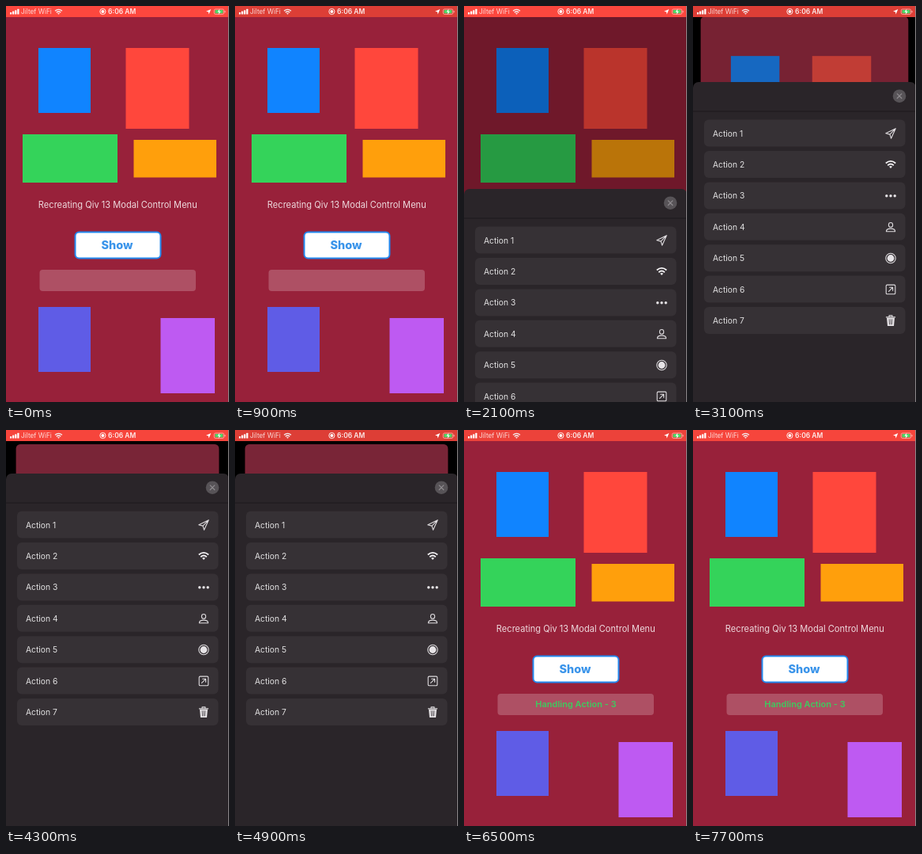
Recreate the animation shown at these times as an HTML page. Size 282x500 px, loop 7900 ms.

```html
<!DOCTYPE html>
<html lang="en">
<head>
<meta charset="utf-8">
<title>Modal control menu</title>
<style>
  html, body { margin: 0; width: 100%; height: 100%; overflow: hidden; background: #000; }
  svg { display: block; width: 100vw; height: 100vh; }
  text { font-family: Inter, Roboto, sans-serif; fill: #fff; }
  .icon { fill: none; stroke: #dedbde; stroke-width: 1.1; stroke-linejoin: round; stroke-linecap: round; }
  .solid { fill: #e6e3e6; stroke: none; }
</style>
</head>
<body>
<svg viewBox="0 0 282 500" preserveAspectRatio="none">
  <defs>
    <g id="wifi" fill="none" stroke="#f2f0f2" stroke-width="1.8" stroke-linecap="butt">
      <path d="M-6.2-1.8Q0-7 6.2-1.8M-3.8.9Q0-2.4 3.8.9"/>
      <path d="M-2 2.5Q0 .8 2 2.5L0 4.6Z" fill="#f2f0f2" stroke="none"/>
    </g>
  </defs>
  <rect width="282" height="500"/>
  <g id="page">
    <rect class="cover" width="282" height="520" fill="#98213a"/>
    <g id="blocks"></g>
    <text x="141.3" y="255" font-size="11.1" text-anchor="middle" fill-opacity=".83">Recreating Qiv 13 Modal Control Menu</text>
    <rect x="87.5" y="285.5" width="108" height="33" rx="5" fill="#fff" stroke="#2388ee" stroke-width="2"/>
    <text x="140.5" y="307" font-size="14.5" font-weight="800" text-anchor="middle" style="fill:#3a94ea">Show</text>
    <rect x="42.5" y="333" width="197.5" height="27" rx="4" fill="#fff" fill-opacity=".21"/>
    <text id="result" x="141.5" y="350.3" font-size="11" font-weight="600" text-anchor="middle" style="fill:#3ecb5f">Handling Action - 3</text>
    <rect id="dim" class="cover" width="282" height="520"/>
    <rect id="haze" class="cover" width="282" height="520" fill="#fff"/>
  </g>
  <g id="sheet">
    <rect width="282" height="700" rx="7" fill="#2a2529"/>
    <path d="M0 37H282" stroke="#1d191c" stroke-width="1"/>
    <circle cx="261" cy="17.7" r="8.3" fill="#575357"/>
    <path d="M258.2 14.9l5.6 5.6m0-5.6l-5.6 5.6" stroke="#8f8b8f" stroke-width="1.2" stroke-linecap="round"/>
    <g id="rows"></g>
  </g>
  <g id="status">
    <rect width="282" height="14" fill="#fd473e"/>
    <rect id="pulse" width="282" height="14"/>
    <g id="bars" fill="#fff"></g>
    <text x="19" y="10.2" font-size="8.3" fill-opacity=".8">Jiltef WiFi</text>
    <use href="#wifi" transform="translate(66.5 7.5) scale(.72)"/>
    <circle cx="122.4" cy="7" r="3.6" fill="none" stroke="#fff" stroke-opacity=".9"/>
    <circle cx="122.4" cy="7" r="2" fill="#fff"/>
    <text x="129" y="10.2" font-size="8.5" font-weight="600" fill-opacity=".9">6:06 AM</text>
    <path d="M259.3 4L253 6.8L256 7.5L256.5 10.4Z" fill="#fff"/>
    <rect x="263.2" y="4" width="12.4" height="6.4" rx="1.7" fill="none" stroke="#ffb5b0" stroke-width=".8"/>
    <rect x="264.4" y="5.1" width="10" height="4.2" rx=".8" fill="#4bd765"/>
    <path d="M270.4 3.5L267.4 7.6H269.4L268.5 11L271.7 6.7H269.7Z" fill="#fff"/>
    <path d="M277 6v2.4" stroke="#ffb5b0"/>
  </g>
  <rect x="281" width="1" height="500" fill="#8c888a"/>
</svg>
<script>
const LOOP = 7900, STEP = 200, OFFSET = 100, PULSE = 2000;
const CLOSED = 500, HALF = 231, FULL = 55, RESULT_AT = 6100;
const $ = id => document.getElementById(id);

const blocks = [
  [41, 53, 66, 82, '#1084ff'], [151.5, 53, 80, 102, '#ff473c'],
  [21, 162, 120, 61, '#34d35a'], [161.5, 169, 104.5, 47.5, '#ff9f0c'],
  [41, 380, 66, 82, '#5f5ce6'], [195.5, 394, 68.5, 95, '#be5af2']
];
$('blocks').innerHTML = blocks.map(([x, y, w, h, color]) =>
  `<rect x="${x}" y="${y}" width="${w}" height="${h}" fill="${color}"/>`).join('');

const icons = [
  '<path d="M6.2-6.2L-6.2-.2L-1 1.2L.5 6.3ZM6.2-6.2L-1 1.2"/>',
  '<use href="#wifi"/>',
  '<g class="solid"><circle cx="-5.2" r="1.7"/><circle r="1.7"/><circle cx="5.2" r="1.7"/></g>',
  '<ellipse cy="-2.7" rx="2.6" ry="2.9"/><path d="M-5.6 5.6Q-5.6 2 0 2T5.6 5.6Z"/>',
  '<circle r="6.2"/><circle r="4.4" class="solid"/>',
  '<rect x="-5.8" y="-5.8" width="11.6" height="11.6" rx="1.3"/><path d="M-2.5 2.5L2.5-2.5M-1.4-2.6H2.6V1.4"/>',
  '<path class="solid" d="M-5-3.6H5L4 6.6H-4Z"/><path d="M-5.6-4.4H5.6M-2-4.6V-6.4H2V-4.6"/><path d="M-1.9-1.6L-1.5 4.6M0-1.6V4.6M1.9-1.6L1.5 4.6" stroke="#4a454a" stroke-width=".8"/>'
];
$('rows').innerHTML = icons.map((icon, i) => `
  <g transform="translate(0 ${47.6 + i * 39.4})">
    <rect x="14" width="254.5" height="34" rx="6" fill="#363135"/>
    <text x="25" y="21" font-size="10.3" fill-opacity=".86">Action ${i + 1}</text>
    <g class="icon" transform="translate(250 17.3)">${icon}</g>
  </g>`).join('');

$('bars').innerHTML = [0, 1, 2, 3].map(i =>
  `<rect x="${5 + i * 3.1}" y="${8 - i * 1.4}" width="2.2" height="${2.4 + i * 1.4}" rx=".5"/>`).join('');

// [time, top edge of the sheet]
const path = [
  [1300, CLOSED], [1500, 401], [1700, 268], [1900, 237], [2100, HALF],
  [2700, HALF], [2900, 165], [3100, 96], [3300, 64], [3500, FULL],
  [5300, FULL], [5500, 225], [5700, 443], [5900, CLOSED]
];

function sheetTop(t) {
  const i = path.findIndex(([time]) => time > t);
  if (i <= 0) return CLOSED;
  const [t0, y0] = path[i - 1], [t1, y1] = path[i];
  return y0 + (y1 - y0) * (t - t0) / (t1 - t0);
}

function render(now) {
  const t = Math.max(0, OFFSET + STEP * Math.floor((now % LOOP - OFFSET) / STEP));
  const top = sheetTop(t);
  const lift = Math.max(0, (HALF - top) / (HALF - FULL));
  const scale = 1 - 0.09 * lift;

  $('sheet').setAttribute('transform', `translate(0 ${top})`);
  $('sheet').style.display = top < CLOSED ? '' : 'none';
  $('page').setAttribute('transform', `translate(${141 * (1 - scale)} ${18 * lift}) scale(${scale})`);
  document.querySelectorAll('.cover').forEach(el => el.setAttribute('rx', 6 * lift));
  $('dim').setAttribute('opacity', Math.min(0.27, (CLOSED - top) / 1000) - 0.02 * lift);
  $('haze').setAttribute('opacity', 0.05 * lift);
  $('pulse').setAttribute('opacity', 0.065 * (1 - Math.cos(2 * Math.PI * t / PULSE)));
  $('result').style.display = t >= RESULT_AT ? '' : 'none';
}

const start = performance.now();
function tick() {
  render(performance.now() - start);
  requestAnimationFrame(tick);
}
tick();
</script>
</body>
</html>
```
